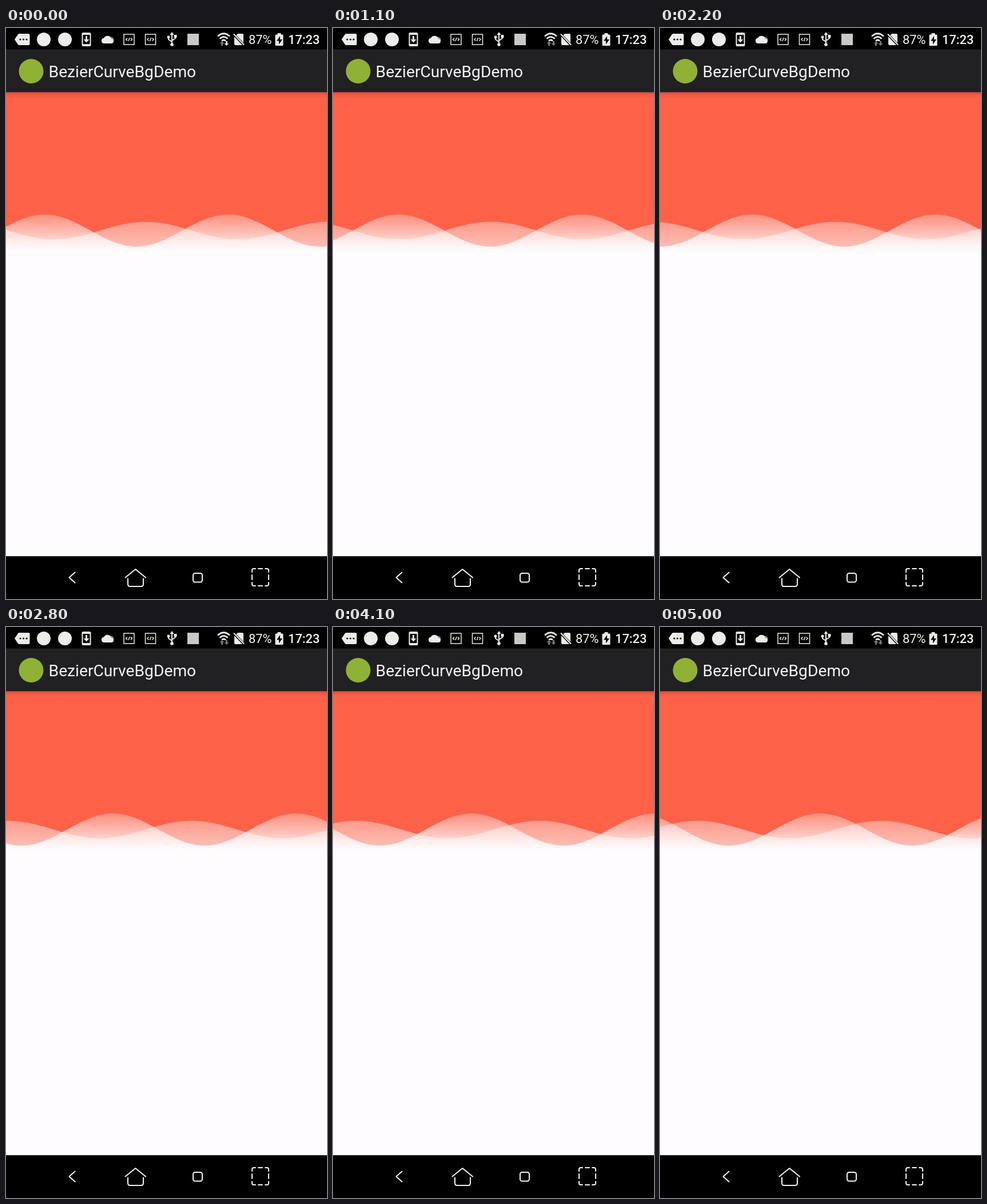
Recreate the animation shown at these times as an HTML page. Size 561x998 px, loop 5.1 s.

```html
<!DOCTYPE html>
<html lang="en">
<head>
<meta charset="utf-8">
<title>BezierCurveBgDemo</title>
<style>
  html, body { margin: 0; width: 100%; height: 100%; overflow: hidden; background: #fefcfe; }
  svg { display: block; width: 561px; height: 998px; }
  text { font-family: Roboto, sans-serif; fill: #f4f4f4; }
  .status { fill: #ececec; }
  .cut { fill: #000; }
  .line { fill: none; stroke: #ececec; stroke-width: 2; }
  .fine { stroke-width: 1.5; }
  .bold { stroke-width: 2.7; }
  .nav { fill: none; stroke: #f4f4f4; stroke-width: 2; stroke-linecap: round; stroke-linejoin: round; }
</style>
</head>
<body>
<svg viewBox="0 0 561 998">
  <defs>
    <linearGradient id="tall" gradientUnits="userSpaceOnUse" x1="0" y1="320" x2="0" y2="392">
      <stop offset="0" stop-color="#fefcfe" stop-opacity=".23"/>
      <stop offset=".6" stop-color="#fefcfe" stop-opacity=".66"/>
      <stop offset="1" stop-color="#fefcfe"/>
    </linearGradient>
    <linearGradient id="low" gradientUnits="userSpaceOnUse" x1="0" y1="336" x2="0" y2="392">
      <stop offset="0" stop-color="#fefcfe" stop-opacity=".36"/>
      <stop offset="1" stop-color="#fefcfe" stop-opacity=".64"/>
    </linearGradient>
    <linearGradient id="shade" x1="0" y1="0" x2="0" y2="1">
      <stop offset="0" stop-color="#501a10" stop-opacity=".28"/>
      <stop offset=".4" stop-color="#501a10" stop-opacity=".09"/>
      <stop offset="1" stop-color="#501a10" stop-opacity="0"/>
    </linearGradient>
    <g id="code">
      <rect class="line fine" x="1" y="1" width="18" height="18"/>
      <path class="line fine" d="M7 7.500l-2.500 2.500 2.500 2.500M13 7.500l2.500 2.500-2.500 2.500M11 7l-2 6"/>
    </g>
  </defs>

  <rect y="112" width="561" height="280" fill="#fd6249"/>
  <path id="lowWave" fill="url(#low)"/>
  <path id="tallWave" fill="url(#tall)"/>
  <rect y="392" width="561" height="532" fill="#fefcfe"/>

  <rect width="561" height="38" fill="#000"/>
  <rect y="37.400" width="561" height="74.800" fill="#212023"/>
  <rect y="112.200" width="561" height="11" fill="url(#shade)"/>
  <circle cx="44" cy="75.500" r="21.500" fill="#8fb135"/>
  <text x="74.600" y="86" font-size="28.200">BezierCurveBgDemo</text>

  <g class="status">
    <path d="M15 20l6-9q1-1 2-1h16q2.500 0 2.500 2.500v15q0 2.500-2.500 2.500H23q-1 0-2-1z"/>
    <g class="cut">
      <circle cx="25" cy="20" r="1.600"/><circle cx="30.500" cy="20" r="1.600"/><circle cx="36" cy="20" r="1.600"/>
    </g>
    <circle cx="66" cy="20" r="12"/>
    <circle cx="103" cy="20" r="12"/>
    <rect x="132.500" y="8" width="16" height="24" rx="2.500"/>
    <path class="cut" d="M134.500 12h12v16h-12z"/>
    <path d="M139 14h3v6h3.500l-5 5.500-5-5.500h3.500z"/>
    <circle cx="183" cy="21" r="5.500" fill="#8d8d8d"/>
    <path d="M171 27a4.800 4.800 0 0 1 0-9.500a7 7 0 0 1 13 1.500a4 4 0 0 1 0 8z"/>
    <use href="#code" x="205" y="10"/>
    <use href="#code" x="242.500" y="10"/>
    <path class="line" d="M290 11v17M290 24l-6-4v-4M290 22l6-4v-4"/>
    <path d="M290 7l3.500 5h-7zM293.500 12h5v5h-5z"/>
    <circle cx="284" cy="16" r="2.500"/><circle cx="290" cy="29" r="2.800"/>
    <rect x="317" y="10" width="20" height="20" fill="#c9c9c9"/>
    <g class="line bold">
      <path d="M370 14.500q10.500-9.500 21 0"/>
      <path d="M373.500 18.700q7-6.500 14 0"/>
      <path d="M377 22.500q3.500-3 7 0"/>
    </g>
    <path fill="#777" d="M376 31v-4h-2.500l4-4 4 4H379v4z"/>
    <path id="download" d="M384 23h3v4h2.500l-4 4-4-4h2.500z"/>
    <path d="M405 10h8q2 0 2 2v16q0 2-2 2h-12q-2 0-2-2V16z"/>
    <path d="M398 11l18 19" stroke="#000" stroke-width="4"/>
    <path class="line" d="M398 10.500l18 19"/>
    <path d="M474.500 9h6v2.500h2.500q1.500 0 1.500 1.500v16.500q0 1.500-1.500 1.500h-11q-1.500 0-1.500-1.500V13q0-1.500 1.500-1.500h2.500z"/>
    <path class="cut" d="M479 14l-6 8.500h4v6l6-8.500h-4z"/>
  </g>
  <text x="424" y="28" font-size="21.800" fill="#ececec">87%</text>
  <text x="493" y="28" font-size="21.800" font-weight="500">17:23</text>

  <rect y="923.200" width="561" height="75" fill="#000"/>
  <g class="nav">
    <path d="M120.500 951.500l-10 9 10 9"/>
    <path d="M208.500 960.500l17.800-14.500 17.800 14.500M213 962.500v9.500q0 4 4 4h19q4 0 4-4v-9.500"/>
    <rect x="327" y="953" width="16" height="15.500" rx="3.500"/>
    <path d="M430 951v-3q0-3 3-3h3M453 945h3q3 0 3 3v3M459 969v3q0 3-3 3h-3M436 975h-3q-3 0-3-3v-3
      M441 945h7M441 975h7M430 956v8M459 956v8"/>
  </g>
</svg>
<script>
  const LOOP = 5100, STEPS = 51, PERIOD = 320.5, MID = 354;
  const $ = id => document.getElementById(id);

  function wave(el, crest, amp, speed) {
    let d = 'M-400 392';
    for (let x = -400; x <= 600; x += 4) {
      const y = MID - amp * Math.cos((x - crest) / PERIOD * 2 * Math.PI);
      d += `L${x} ${y.toFixed(2)}`;
    }
    el.setAttribute('d', d + 'V392Z');
    el.animate(
      [{ transform: 'translateX(0px)' }, { transform: `translateX(${speed * LOOP}px)` }],
      { duration: LOOP, iterations: Infinity, easing: `steps(${STEPS})` }
    );
  }

  wave($('lowWave'), 244.6, 15.3, 0.0283);
  wave($('tallWave'), 67.8, 28, 0.0425);

  // The download arrow is lit briefly at the start of each loop.
  const lit = 300 / LOOP;
  $('download').animate(
    [{ fill: '#ececec', offset: 0 }, { fill: '#ececec', offset: lit },
     { fill: '#777', offset: lit }, { fill: '#777', offset: 1 }],
    { duration: LOOP, iterations: Infinity }
  );
</script>
</body>
</html>
```
